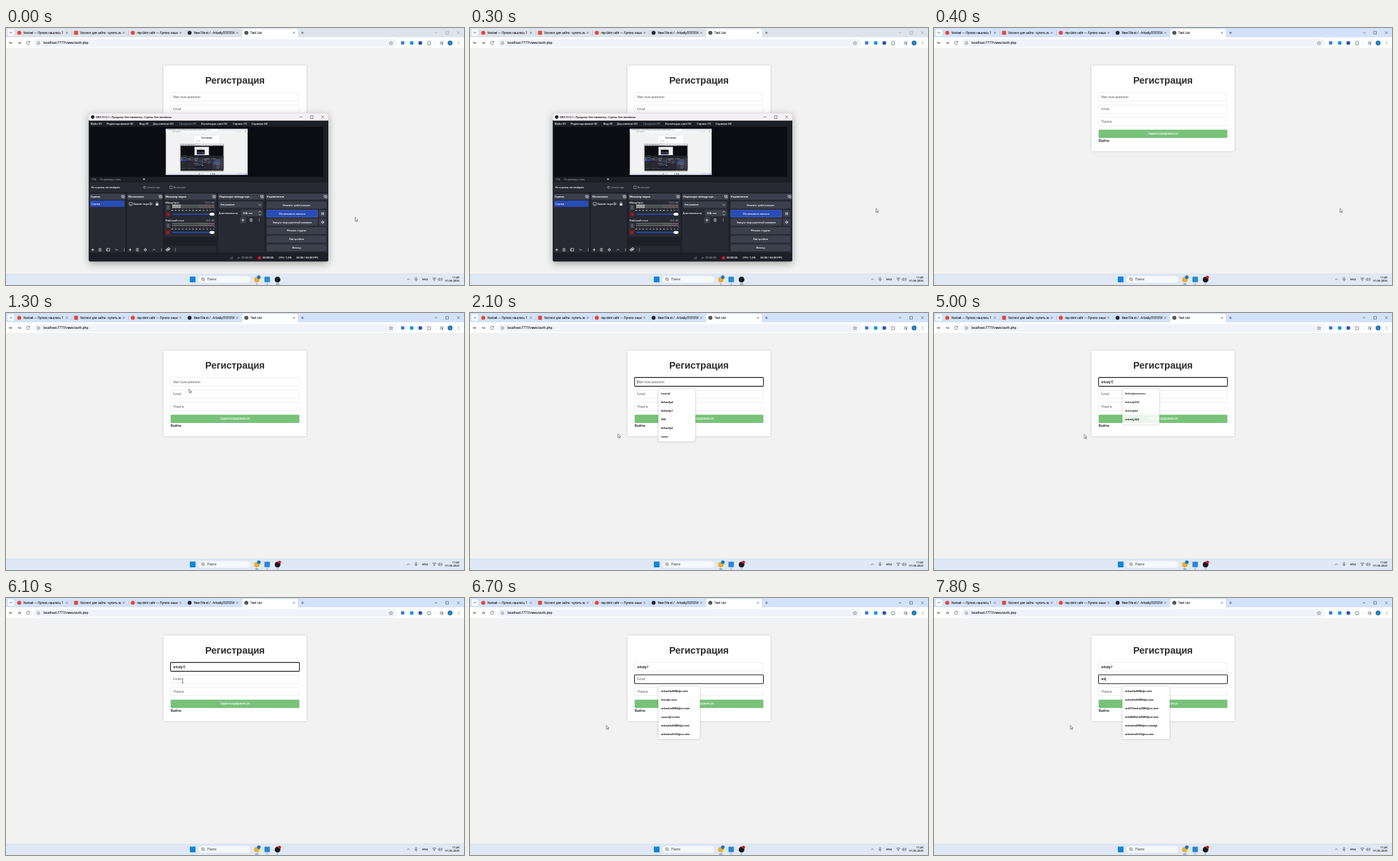
These frames come from a looping animation (692x388 px, 8 s). An HTML page:

```html
<!DOCTYPE html>
<html lang="ru">
<head>
<meta charset="utf-8">
<title>Task List</title>
<style>
html, body { margin: 0; width: 100%; height: 100%; overflow: hidden; background: #f2f2f2 }
svg { display: block }
text { font-family: 'Open Sans', 'Noto Sans', sans-serif; white-space: pre; stroke-width: .12 }
.page { font-family: 'Liberation Sans', Arial, sans-serif; stroke-width: .05 }
.mid { text-anchor: middle }
.end { text-anchor: end }
.bold { font-weight: 600 }
.heading { font-weight: 700 }
.card { filter: drop-shadow(0 0 1.5px #0003) }
.menu { filter: drop-shadow(0 .6px .9px #0005) }
.window { filter: drop-shadow(0 3px 6px #0005) }
</style>
</head>
<body>
<svg id="stage" width="692" height="388" viewBox="0 0 692 388"></svg>
<script>
const LOOP = 8000, STEP = 100;
const RAISE = 400; // a click brings the browser in front of the recorder

const rect = (x, y, w, h, fill, r = 0, more = '') =>
  `<rect x="${x}" y="${y}" width="${w}" height="${h}" rx="${r}" fill="${fill}" ${more}/>`;
const dot = (x, y, r, fill) => `<circle cx="${x}" cy="${y}" r="${r}" fill="${fill}"/>`;
const line = (d, color = '#444', w = .6, fill = 'none') =>
  `<path d="${d}" stroke="${color}" stroke-width="${w}" fill="${fill}"/>`;
// y is the middle of the lower-case line
const text = (x, y, size, str, fill = '#222', cls = '') =>
  `<text x="${x}" y="${y + size * .35}" font-size="${size}" fill="${fill}" stroke="${fill}" class="${cls}">${str}</text>`;
const clipped = (x, y, w, h, body) => `<svg x="${x}" y="${y}" width="${w}" height="${h}">${body}</svg>`;

// small icons, each centred on x, y
const cross = (x, y, r = 1.5, c = '#333') => line(`M${x - r} ${y - r}l${2 * r} ${2 * r}m0 ${-2 * r}l${-2 * r} ${2 * r}`, c, .5);
const plus = (x, y, c = '#333', w = .6) => line(`M${x - 2} ${y}h4m-2 -2v4`, c, w);
const chevron = (x, y, dir = 1, c = '#333') => line(`M${x - 1.8} ${y - dir * .9}l1.8 ${dir * 1.8}l1.8 ${-dir * 1.8}`, c, .7);
const dots = (x, y, c = '#333') => [-1.8, 0, 1.8].map(d => dot(x, y + d, .5, c)).join('');
const ring = (x, y, r, c, w = .7) => `<circle cx="${x}" cy="${y}" r="${r}" fill="none" stroke="${c}" stroke-width="${w}"/>`;
const gear = (x, y, c) => ring(x, y, 1.4, c, 1) + line(`M${x - 2.3} ${y}h.7m3.2 0h.7M${x} ${y - 2.3}v.7m0 3.2v.7`, c, .8);
const trash = (x, y, c) => line(`M${x - 2} ${y - 1.7}h4M${x - 1.5} ${y - 1.5}v3.6h3v-3.6M${x - .5} ${y - 2.4}h1M${x} ${y - .5}v1.8`, c, .6);

function browser(active) {
  const tabs = [
    ['#ee4030', 'hostvel — Лупикс нашлось 1'],
    ['#e04a3c', 'Хостинг для сайта - купить вирт'],
    ['#ee4030', 'rep dom сайт — Лупикс нашлось'],
    ['#24292f', 'New File at / · Arkadiy353535/task'],
    ['#555', 'Task List']];
  const button = active ? '#222' : '#888';
  let s = rect(0, 0, 692, 388, '#f2f2f2') + rect(0, 0, 692, 15, active ? '#d3e2fa' : '#dde3ea') + rect(0, 14, 692, 17, '#fff')
    + rect(2.5, 1.8, 10, 10.5, '#f3f7fd', 3) + chevron(7.3, 7)
    + rect(357, 1.5, 84, 16, '#fff', 3);
  tabs.forEach(([color, name], i) => {
    const x = 20 + i * 85.8;
    s += (i == 1 ? rect(x - 3, 4.2, 6, 6, color, .8) : dot(x, 7.2, 3, color))
      + clipped(x + 6, 0, 62, 14, text(.4, 7.2, 4.4, name))
      + cross(x + 72, 7.2);
    if (i < 3) s += rect(x + 79, 4, .5, 7, '#a9b8d0');
  });
  s += plus(448, 7.2) + line('M648 7.2h4M664.5 5.2h4v4h-4z', button, .5) + cross(683.5, 7.2, 2, button)
    + line('M10 22.5h-5m2 -2l-2 2l2 2M17.5 22.5h5m-2 -2l2 2l-2 2', '#444', .7)
    + line('M35.4 21a2.4 2.4 0 1 0 .4 2.2M35.8 19.8v1.6h-1.6', '#444', .7)
    + rect(42, 16.8, 548, 11.6, '#f0f3f9', 5.8) + ring(49, 22.6, 2.1, '#444', .5) + line('M49 22.2v1.5M49 21.2v.5', '#444', .5)
    + text(56.6, 22.6, 4.75, 'localhost:7777/views/auth.php')
    + line('M581.6 20l.8 1.9l2 .1l-1.6 1.3l.6 2l-1.8 -1.1l-1.8 1.1l.6 -2l-1.6 -1.3l2 -.1z', '#444', .5)
    + rect(596.8, 20, 5, 5, '#3c7de0', .8) + dot(613, 22.6, 2.9, '#1b98e8') + dot(626, 22.6, 2.9, '#2456c8')
    + line('M637 21h1.3a.8 .8 0 0 1 1.6 0h1.2v1.4a.8 .8 0 0 1 0 1.6v1.2h-4.1z', '#444', .6)
    + rect(648.6, 19.5, .4, 6, '#c5d0e2')
    + line('M655.5 21h5M655.5 22.7h3M655.5 24.4h2M660 21v3', '#444', .6) + dot(659.4, 24.2, .9, '#444')
    + dot(671, 22.6, 3.7, '#1677b8') + text(671, 22.6, 3.6, 'т', '#fff', 'mid') + dots(684, 22.6)
    + rect(0, 30.5, 692, .5, '#dde2ea');
  s += rect(237.8, 56.6, 216.3, 129.4, '#fff', 1.5, 'class="card"')
    + text(346, 78.6, 14.4, 'Регистрация', '#333', 'page mid heading')
    + rect(248.7, 153.5, 194.6, 12.4, '#78c279', 1.4)
    + text(346, 159.7, 4.8, 'Зарегистрироваться', '#fff', 'page mid')
    + text(248.7, 170.4, 5.77, 'Войти', '#000', 'page');
  return s + taskbar(active);
}

function taskbar(active) {
  return rect(0, 371, 692, 17, '#dfe8f4') + rect(0, 371, 692, .5, '#cfd8e4')
    + rect(277.8, 375.3, 8.6, 8.6, '#1583d8', .6)
    + rect(290.5, 374, 79, 11, '#f5f8fc', 5.5, 'stroke="#d2dbe8" stroke-width=".4"')
    + ring(297.5, 379, 1.8, '#333') + line('M298.8 380.4l1.7 1.7', '#333') + text(304, 379.6, 4.7, 'Поиск', '#555')
    + dot(379, 380, 4.3, '#e7b233') + dot(382, 376.3, 2.7, '#1677c8')
    + rect(390.5, 375.6, 8.2, 8.2, '#2587d4', 1)
    + dot(410.3, 379.9, 4.3, '#191919') + (active ? dot(413.2, 376.2, 2.2, '#e01020') : '')
    + [379, 394.6, 410.3].map((x, i) => i == (active ? 0 : 2)
      ? rect(x - 2.5, 386, 5, .9, '#1777c5', .4) : rect(x - 1.2, 386, 2.4, .9, '#888', .4)).join('')
    + chevron(608, 379.4, -1) + rect(618.7, 376.5, 1.7, 3.6, 'none', .8, 'stroke="#333" stroke-width=".5"')
    + line('M617.7 379a1.9 1.9 0 0 0 3.8 0M619.6 381v1.5', '#333', .5) + text(629, 379.6, 4.2, 'ENG')
    + line('M644.4 378.2a4 4 0 0 1 5.4 0M645.4 379.6a2.6 2.6 0 0 1 3.4 0', '#222', .6) + dot(647.1, 381, .7, '#222')
    + line('M653 378.6h1l1.5 -1.4v4.6l-1.5 -1.4h-1zM657 378a2.2 2.2 0 0 1 0 3M658 377a3.6 3.6 0 0 1 0 5', '#222', .5)
    + text(685, 376.4, 4.2, '11:43', '#222', 'end') + text(685, 382, 4.2, '31.05.2025', '#222', 'end');
}

const desktop = depth => browser(false) + fields(-1, '') + recorder(depth);

// recorder window; its preview shows the whole screen again
function recorder(depth) {
  const W = '#f2f2f4', G = '#8b8e98', DARK = '#1d1f26', PANEL = '#272a33', HEAD = '#3c404d', BLUE = '#284cb8';
  const label = (x, y, str, c = W, cls = '') => text(x, y, 4.25, str, c, cls);
  let s = rect(125, 129, 362, 223.6, DARK, 2, 'class="window"')
    + rect(125, 129, 362, 10.6, '#f5f0f3', 2) + rect(125, 136, 362, 3.6, '#f5f0f3')
    + dot(131, 134.3, 2.6, '#222') + text(136, 134.4, 4, 'OBS 31.0.1 - Профиль: Без названия - Сцены: Без названия', '#111')
    + line('M443.6 134.4h4M460 132.4h4v4h-4z', '#222', .5) + cross(478.4, 134.4, 2, '#222');
  [[128, 'Файл (F)'], [152, 'Редактирование (E)'], [201.5, 'Вид (V)'], [222, 'Док-панели (D)'], [262, 'Профиль (P)'],
   [295, 'Коллекция сцен (S)'], [343, 'Сервис (T)'], [371, 'Справка (H)']]
    .forEach(([x, str], i) => s += label(x, 144.6, str, i == 4 ? G : W));
  s += rect(126.5, 149, 353, 75.5, '#0c0d12');
  if (depth) s += clipped(241.3, 152.2, 124, 69.5, `<g transform="scale(.1792)">${desktop(depth - 1)}</g>`);
  s += text(129, 228.4, 3.8, '17%', G) + text(142, 228.4, 3.8, 'По размеру окна', G) + line('M206.5 227.4h4l-2 2z', W, 0, W)
    + rect(126.5, 233, 360, 15, PANEL) + label(129, 240.5, 'Источник не выбран')
    + gear(209.3, 240.5, G) + label(213.5, 240.5, 'Свойства', G) + line('M247.5 238.5h3.5v4h-3.5z', G, .8) + label(252.6, 240.5, 'Фильтры', G);
  [[126.5, 54, 'Сцены'], [183, 54, 'Источники'], [239.5, 78.5, 'Микшер звука'], [320.5, 70, 'Переходы между сце...'], [392.5, 94, 'Управление']]
    .forEach(([x, w, name]) => s += rect(x, 250, w, 89, PANEL, 1) + rect(x, 250, w, 9, HEAD, 1)
      + label(x + 1.6, 254.5, name, W, 'bold') + line(`M${x + w - 6} 252.4h3.4v3h-3.4zM${x + w - 4.6} 253.6h3.4v3h-3.4z`, W, .5));
  s += rect(127, 260.4, 52, 9.6, BLUE, 1) + label(129, 265.4, 'Сцена')
    + rect(186, 263.4, 5, 3.6, 'none', .4, `stroke="${W}" stroke-width=".6"`) + line('M187 268.3h3', W)
    + clipped(192, 260, 23.5, 11, text(.2, 5.5, 4.25, 'Захват экрана', W))
    + line('M216 265.5q2.7 -3.4 5.4 0q-2.7 3.4 -5.4 0z', W, .6) + dot(218.7, 265.5, .8, W)
    + rect(226.2, 265, 4, 3, W, .4) + line('M227 265v-1.2a1.2 1.2 0 0 1 2.4 0v1.2', W, .6);
  [131, 187.5].forEach((x, i) => s += plus(x, 334.8, W, .8) + trash(x + 11, 334.8, W)
    + (i ? gear(x + 23, 334.8, W) : line('M152 332.8h4.5v4h-4.5zM152 334.8h2.2', W, .7)) + chevron(x + 36, 334.8, -1, W) + dots(x + 47.5, 334.8, W));
  [[263.5, 'Микр/доп', '10.0 dB', 13], [291, 'Рабочий стол', '0.0 dB', 0]].forEach(([y, name, db, level]) => {
    s += label(241, y, name) + label(315, y, db, G, 'end');
    [3.2, 6].forEach(d => s += rect(251, y + d, 40, 2, '#5a6160') + rect(291, y + d, 14, 2, '#6a6964') + rect(305, y + d, 10, 2, '#6e6266')
      + rect(251, y + d, level, 2, '#b4bbb6'));
    for (let i = 0; i <= 12; i++) s += rect(251 + i * 5.25, y + 8.8, .4, 1.2, W) + text(251 + i * 5.25, y + 12, 2.2, i * 5 - 60, W, 'mid');
    s += rect(241.4, y + 3.6, 7, 8, HEAD, 1) + dots(245, y + 7.6, W) + rect(241.4, y + 14, 7, 7, '#6b2029', 1) + cross(245, y + 17.5, 1.4, '#d93645')
      + rect(251, y + 16.8, 60, 1.6, BLUE, .8) + rect(307.5, y + 15.4, 7.5, 4.4, '#fff', 2);
  });
  s += rect(240, 315.5, 77.5, 13.5, DARK) + gear(243.5, 335, W) + gear(246, 333.5, W) + dots(256, 334.8, W)
    + rect(321.8, 262, 66, 9.6, HEAD, 1) + label(324, 266.9, 'Затухание') + chevron(383.5, 267, 1, W)
    + label(321.5, 279.5, 'Длительность') + rect(355, 274.6, 33, 9.6, HEAD, 1) + label(358, 279.5, '300 ms')
    + chevron(383.5, 277.3, -1, W) + chevron(383.5, 281.7, 1, W)
    + rect(353.6, 285.5, 9, 9, HEAD, 1) + plus(358, 290, W, .8) + trash(370.3, 290, W) + dots(382.4, 290, W);
  ['Начать трансляцию', 'Остановить запись', 'Запуск виртуальной камеры', 'Режим студии', 'Настройки', 'Выход'].forEach((name, i) => {
    const y = 267.3 + i * 12.9, split = i == 1 || i == 2, w = split ? 77 : 90;
    s += rect(394, y - 5.3, w, 10.6, i == 1 ? BLUE : HEAD, 1.2, i == 1 ? 'stroke="#5b7de0" stroke-width=".5"' : '')
      + label(394 + w / 2, y, name, W, 'mid');
    if (split) s += rect(473, y - 5.3, 11, 10.6, HEAD, 1.2) + (i == 1 ? line(`M477.4 ${y - 2}v4M479.6 ${y - 2}v4`, W, 1.1) : gear(478.5, y, W));
  });
  return s + line('M338 349v-1M340 349v-2.5M342 349v-4', G, .8) + line('M350 347h4m-3 -1.3l-1 1.3l1 1.3', G)
    + text(356, 347, 4.1, '00:00:00', G) + dot(383, 347, 2.5, '#d5162c') + text(388, 347, 4.1, '00:00:00', W)
    + text(412, 347, 4.1, 'CPU: 1.6%', W) + text(439, 347, 4.1, '60.00 / 60.00 FPS', W);
}

const ctx = document.createElement('canvas').getContext('2d');
ctx.font = "480px 'Liberation Sans', Arial, sans-serif";

const fieldY = i => 104 + i * 18.65;
function fields(focus, typed, caret) {
  return ['Имя пользователя', 'Email', 'Пароль'].map((hint, i) => {
    const y = fieldY(i), on = i == focus, grow = on ? .3 : 0;
    const value = on ? typed : i < focus ? 'arkady7' : '';
    return rect(248.9 - grow, y - 6.3 - grow, 194.2 + 2 * grow, 12.6 + 2 * grow, '#fff', 1.4,
        `stroke="${on ? '#1a1a1a' : '#ddd'}" stroke-width="${on ? 1.1 : .5}"`)
      + text(252.6, y, 4.8, value || hint, value ? '#000' : '#757575', 'page')
      + (on && caret ? rect(252.7 + ctx.measureText(value).width / 100, y - 2.8, .5, 5.6, '#000') : '');
  }).join('');
}

const lists = [null,
  [56, 'Leonid', 'Arkadiy4', 'Arkadiy1', '555', 'Arkadiy2', 'zxzxc'],
  [63, 'Arkadiy4', 'Arkadiy1', 'Arkadiy2', 'Arkadiy', 'Arkadiy546546546654', 'Artur'],
  [56, 'Arkadyssssssso', 'Arkady555', 'Arkady44', 'arkady345'],
  [63, 'arkashk3006@v.test', 'leon@v.test', 'arkasha3006@vo.test', 'zxzxc@vo.test', 'arkashk33006@v.test', 'arkasha3163@vo.test'],
  [69, 'arkashk3006@v.test', 'arkashk33006@v.test', 'ar3313asha3006@vo.test', 'ark4566sha3006@vo.test', 'arkasha3006@vo.test', 'arkasha3163@vo.test'],
  [71.6, 'arkashk3006@v.test', 'arkashk33006@v.test', 'ar3313asha3006@vo.test', 'ark4566sha3006@vo.test', 'arkasha3006@vo.testfgf', 'arkasha3163@vo.test']];

function menu(list, field) {
  if (!list) return '';
  const [w, ...rows] = list, y = fieldY(field) + 18;
  return rect(284.5, y - 7.2, w, rows.length * 12.95 + 1.8, '#fff', 1.5, 'class="menu"')
    + rows.map((row, i) => text(288.8, y + i * 12.95, 4.2, row, '#222', 'bold')).join('');
}

// time, focused field, typed text, suggestion list
const states = [
  [0, -1, '', 0], [1700, 0, '', 1], [1800, 0, '', 1],
  [3600, 0, 'a', 2], [3900, 0, 'ar', 2], [4100, 0, 'ark', 3], [4300, 0, 'arka', 3], [4500, 0, 'arkad', 3],
  [5000, 0, 'arkady7', 3], [6200, 1, '', 4], [7500, 1, 'a', 5], [7700, 1, 'ar', 6], [7800, 1, 'ark', 6]];

// time, x, y of the pointer; it slows down towards each point
const path = [
  [0, 527.5, 286], [300, 613.5, 272.5], [RAISE, 613.5, 272.5], [900, 320.5, 183], [1500, 271, 106], [1800, 271, 106],
  [2100, 223.6, 182.5], [2300, 227, 183.5], [5400, 227, 183.5], [6100, 266.8, 125], [6200, 266.8, 125],
  [6500, 197, 188], [6700, 206, 192.3], [LOOP, 206, 192.3]];

function pointer(t) {
  const k = path.findIndex(p => p[0] > t), [t0, x0, y0] = path[k - 1], [t1, x1, y1] = path[k];
  const p = 1 - ((t1 - t) / (t1 - t0)) ** 2;
  const x = x0 + (x1 - x0) * p, y = y0 + (y1 - y0) * p;
  const overField = x > 249 && x < 443 && [0, 1, 2].some(i => Math.abs(y - fieldY(i)) < 6.3);
  return overField
    ? line(`M${x - 1.3} ${y - 3}h2.6M${x} ${y - 3}v6M${x - 1.3} ${y + 3}h2.6`, '#222', .6)
    : line(`M${x} ${y}v5.6l1.3 -1.2l1 2.2l.9 -.4l-1 -2.1h1.8z`, '#222', .5, '#fff');
}

stage.innerHTML = browser(true) + '<g id="form"></g><g id="popup"></g>'
  + `<g id="recording">${desktop(2)}</g><g id="mouse"></g>`;
const [form, popup, recording, mouse] = ['form', 'popup', 'recording', 'mouse'].map(id => document.getElementById(id));

function draw(now) {
  const t = Math.floor(now % LOOP / STEP) * STEP;
  const [start, field, typed, list] = states.filter(s => s[0] <= t).pop();
  form.innerHTML = fields(field, typed, (t - start) % 1000 < 500);
  popup.innerHTML = menu(lists[list], field);
  popup.setAttribute('opacity', start == 5000 ? Math.max(0, 1 - (t - 4970) / 200) : 1);
  recording.style.display = t < RAISE ? '' : 'none';
  mouse.innerHTML = pointer(t);
  requestAnimationFrame(() => draw(performance.now() - origin));
}
const origin = performance.now();
draw(0);
</script>
</body>
</html>
```
